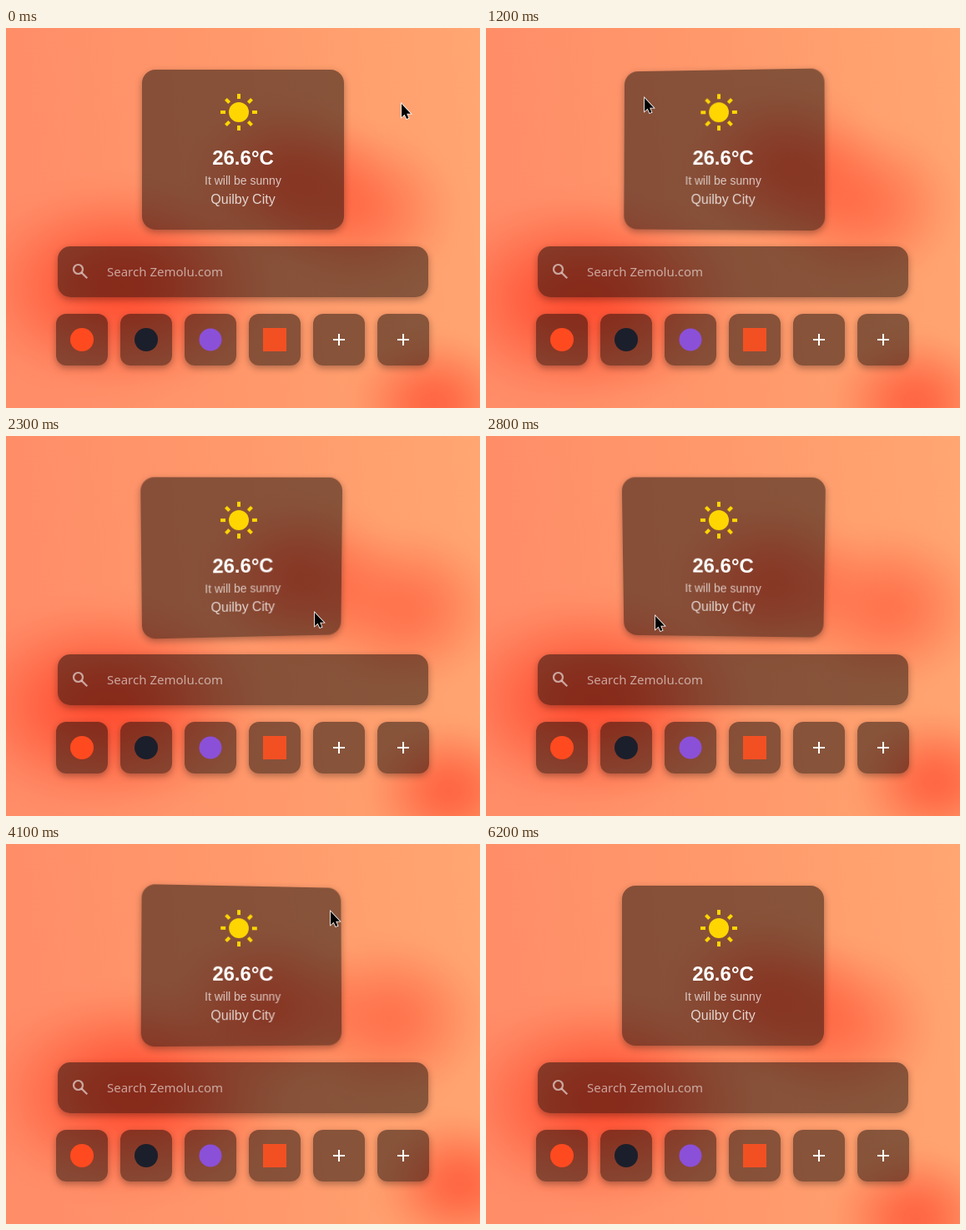
Recreate the animation shown at these times as an HTML page with a canvas. Size 568 by 456 pixels, loop 6300 ms.

```html
<!DOCTYPE html>
<html lang="en">
<head>
<meta charset="utf-8">
<title>Start page</title>
<style>
  html, body { margin: 0; width: 100%; height: 100%; overflow: hidden; }
  #stage { position: relative; width: 568px; height: 456px; overflow: hidden; }
  #stage > * { position: absolute; }
  canvas, .overlay { left: 0; top: 0; }
  .panel {
    box-sizing: border-box;
    background: rgba(0, 0, 0, .47);
    box-shadow: 0 3px 8px rgba(0, 0, 0, .32);
  }
  #card {
    left: 163px; top: 50px; width: 242px; height: 192px;
    border-radius: 16px;
    font-family: "Liberation Sans", Arial, sans-serif;
    text-align: center;
  }
  #card > * { position: absolute; left: 0; width: 100%; white-space: nowrap; }
  #card svg { top: 0; height: 100%; }
  .degrees { top: 92px; font-size: 24px; font-weight: bold; line-height: 28px; color: #fff; }
  .forecast { top: 123px; font-size: 14px; line-height: 20px; color: rgba(255, 255, 255, .7); }
  .place { top: 146px; font-size: 16px; line-height: 20px; color: rgba(255, 255, 255, .78); }
  #search {
    left: 62px; top: 262px; width: 444px; height: 61px;
    border-radius: 15px; padding-left: 59px;
    font: 15px/61px "Noto Sans", "Open Sans", sans-serif;
    color: rgba(255, 255, 255, .57);
  }
  .tile { top: 343px; width: 62px; height: 62px; border-radius: 12px; }
</style>
</head>
<body>
<div id="stage">
  <canvas id="backdrop" width="568" height="456"></canvas>
  <div id="card" class="panel">
    <svg viewBox="0 0 242 192"><g id="sun" fill="#ffd600" transform="translate(116 51)"><circle r="12"/></g></svg>
    <div class="degrees">26.6°C</div>
    <div class="forecast">It will be sunny</div>
    <div class="place">Quilby City</div>
  </div>
  <div id="search" class="panel">Search Zemolu.com</div>
  <svg class="overlay" width="568" height="456">
    <g fill="none" stroke="#fff" stroke-opacity=".57" stroke-width="2.2">
      <circle cx="86.5" cy="289.5" r="5.5"/>
      <path d="M90.6 293.6L97.3 300.3"/>
    </g>
    <circle cx="91" cy="374" r="14" fill="#ff4a20"/>
    <circle cx="168" cy="374" r="14" fill="#1b1f2b"/>
    <circle cx="245" cy="374" r="13.5" fill="#8b50d8"/>
    <rect x="308" y="360" width="28" height="28" fill="#f25022"/>
    <path d="M392 374H406M399 367V381M469 374H483M476 367V381" stroke="#fff" stroke-width="2"/>
    <path id="pointer" d="M0 0V16L3.6 12.7L6.1 18L8.5 17L6.2 11.8H11Z"
      stroke="#fff" stroke-width="1.6" paint-order="stroke"/>
  </svg>
</div>
<script>
const LOOP = 6300, STEP = 100, MAX_TILT = 9.5, TILT_LAG = 300;
const CARD = { x: 284, y: 146, halfWidth: 121, halfHeight: 96 };

// Places the pointer passes, with the time it gets there
const STOPS = [
  { t: 0, x: 474, y: 91 },
  { t: 500, x: 350, y: 205 },
  { t: 850, x: 200, y: 190 },
  { t: 1200, x: 190, y: 84 },
  { t: 1400, x: 430, y: 98 },
  { t: 1700, x: 409, y: 109 },
  { t: 2300, x: 370, y: 212 },
  { t: 2800, x: 203, y: 216 },
  { t: 3700, x: 385, y: 205 },
  { t: 4100, x: 389, y: 81 },
  { t: 5000, x: 187, y: 81 },
  { t: 5500, x: 380, y: 200 },
  { t: 5900, x: 600, y: 180 }
];

// Each glow swings about its centre once per loop, furthest out at its peak time
const GLOWS = [
  { x: 137, y: 312, dx: 20, dy: -15, peak: 4800, rx: 205, ry: 142, strength: .9 },
  { x: 338, y: 182, dx: 24, dy: -17, peak: 1500, rx: 130, ry: 108, strength: .6 },
  { x: 452, y: 212, dx: 30, dy: -6, peak: 2800, rx: 135, ry: 110, strength: .5 },
  { x: 528, y: 430, dx: 17, dy: -24, peak: 3700, rx: 112, ry: 95, strength: .65 }
];

const $ = id => document.getElementById(id);
const ctx = $('backdrop').getContext('2d');
const ease = u => u * u * (3 - 2 * u);

function pointerAt(t) {
  const next = STOPS.findIndex(stop => stop.t > t);
  if (next < 0) return STOPS[STOPS.length - 1];
  if (next === 0) return STOPS[0];
  const a = STOPS[next - 1], b = STOPS[next];
  const u = ease((t - a.t) / (b.t - a.t));
  return { x: a.x + (b.x - a.x) * u, y: a.y + (b.y - a.y) * u };
}

// The card leans away under the pointer, averaged over the recent past
function tiltAt(t) {
  const samples = 12;
  let across = 0, down = 0;
  for (let i = 0; i < samples; i++) {
    const p = pointerAt(t - TILT_LAG * i / samples);
    const nx = (p.x - CARD.x) / CARD.halfWidth;
    const ny = (p.y - CARD.y) / CARD.halfHeight;
    if (Math.abs(nx) > 1 || Math.abs(ny) > 1) continue;
    across += nx * MAX_TILT / samples;
    down += ny * MAX_TILT / samples;
  }
  return { across, down };
}

function paintGlow(glow, t) {
  const swing = Math.cos((t - glow.peak) / LOOP * 2 * Math.PI);
  const fade = ctx.createRadialGradient(0, 0, 0, 0, 0, 1);
  for (let r = 0; r <= 1; r += .125) {
    fade.addColorStop(r, `rgba(255,72,44,${glow.strength * ease(1 - r)})`);
  }
  ctx.save();
  ctx.translate(glow.x + glow.dx * swing, glow.y + glow.dy * swing);
  ctx.scale(glow.rx, glow.ry);
  ctx.fillStyle = fade;
  ctx.fillRect(-1, -1, 2, 2);
  ctx.restore();
}

function paintBackdrop(t) {
  const base = ctx.createLinearGradient(0, 60, 568, 0);
  base.addColorStop(0, '#ff8d68');
  base.addColorStop(.5, '#ff996b');
  base.addColorStop(1, '#ffa672');
  ctx.fillStyle = base;
  ctx.fillRect(0, 0, 568, 456);
  GLOWS.forEach(glow => paintGlow(glow, t));
}

function build() {
  for (let i = 0; i < 8; i++) {
    $('sun').insertAdjacentHTML('beforeend',
      `<rect x="-2" y="-22" width="4" height="6" transform="rotate(${i * 45})"/>`);
  }
  for (let i = 0; i < 6; i++) {
    const tile = document.createElement('div');
    tile.className = 'panel tile';
    tile.style.left = 60 + 77 * i + 'px';
    $('search').before(tile);
  }
}

function draw(now) {
  const t = Math.floor(now % LOOP / STEP) * STEP;
  const { x, y } = pointerAt(t);
  const { across, down } = tiltAt(t);
  paintBackdrop(t);
  $('pointer').setAttribute('transform', `translate(${Math.round(x)} ${Math.round(y)})`);
  $('card').style.transform = across || down
    ? `perspective(1000px) rotateX(${-down}deg) rotateY(${across}deg)` : 'none';
  requestAnimationFrame(draw);
}

build();
draw(performance.now());
</script>
</body>
</html>
```
